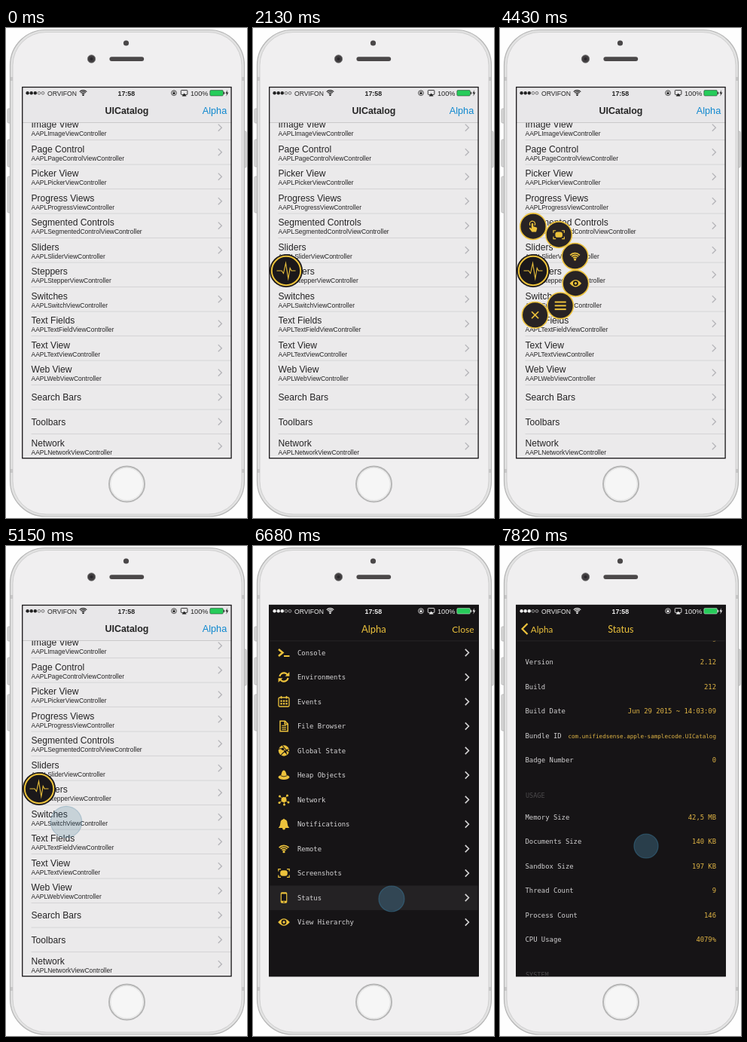
Animation of 320x650 px, one loop 8000 ms. Source, as an HTML page with a canvas:

```html
<!DOCTYPE html>
<html lang="en">
<head>
<meta charset="utf-8">
<title>Debug menu demo</title>
<style>
html, body { margin: 0; width: 100%; height: 100%; overflow: hidden; background: #fff; }
canvas { display: block; width: 320px; height: 650px; }
</style>
</head>
<body>
<canvas id="stage"></canvas>
<script>
const LOOP = 8000, ROW = 32.5, TAU = Math.PI * 2;
const GOLD = '#ecc23c', DARK = '#161416', INK = '#252425';
const SANS = '"Liberation Sans", Arial, sans-serif';
const MONO = '"DejaVu Sans Mono", monospace';
const HUMAN = 'Lato, sans-serif';

const canvas = document.getElementById('stage');
const c = canvas.getContext('2d');
const dpr = window.devicePixelRatio || 1;
canvas.width = 320 * dpr;
canvas.height = 650 * dpr;

const ramp = (t, a, b) => Math.min(1, Math.max(0, (t - a) / (b - a)));
const smooth = x => x * x * (3 - 2 * x);
const spring = (t, start, k) => {
  const x = Math.max(0, t - start) * k;
  return 1 - (1 + x) * Math.exp(-x);
};

function text(s, x, y, font, color, align = 'left') {
  c.font = font;
  c.fillStyle = color;
  c.textAlign = align;
  c.fillText(s, x, y);
}
function rect(x, y, w, h, color) {
  c.fillStyle = color;
  c.fillRect(x, y, w, h);
}
function round(x, y, w, h, r, fill, stroke, lw = 1) {
  c.beginPath();
  c.roundRect(x, y, w, h, r);
  paint(fill, stroke, lw);
}
function disc(x, y, r, fill, stroke, lw = 1) {
  c.beginPath();
  c.arc(x, y, r, 0, TAU);
  paint(fill, stroke, lw);
}
function paint(fill, stroke, lw) {
  if (fill) { c.fillStyle = fill; c.fill(); }
  if (stroke) { c.strokeStyle = stroke; c.lineWidth = lw; c.stroke(); }
}
function line(pts, color, lw) {
  c.beginPath();
  for (let i = 0; i < pts.length; i += 2) c.lineTo(pts[i], pts[i + 1]);
  paint(null, color, lw);
}
function shape(d, fill, stroke, lw) {
  const p = new Path2D(d);
  if (fill) { c.fillStyle = fill; c.fill(p); }
  if (stroke) { c.strokeStyle = stroke; c.lineWidth = lw; c.stroke(p); }
}
function at(x, y, draw, scale = 1) {
  c.save();
  c.translate(x, y);
  c.scale(scale, scale);
  draw();
  c.restore();
}
const chevron = (x, y, color, lw) => line([x - 2.2, y - 4.6, x + 2.4, y, x - 2.2, y + 4.6], color, lw);

function wifi(color, r = 2.5, lw = 1.7) {
  for (let i = 1; i < 4; i++) {
    c.beginPath();
    c.arc(0, 4.5, r * i + .6, -Math.PI * .76, -Math.PI * .24);
    paint(null, color, lw);
  }
  disc(0, 4.2, r * .6, color);
}

// Icons are drawn around 0,0 in a box of about 15 px
const icon = {
  console() {
    line([-7, -4.5, -1.5, 0, -7, 4.5], GOLD, 2.5);
    line([0, 4.5, 7.5, 4.5], GOLD, 2);
  },
  refresh() {
    for (const s of [1, -1]) {
      c.save();
      c.scale(s, s);
      c.beginPath();
      c.arc(0, 0, 5.7, Math.PI * 1.06, Math.PI * 1.8);
      paint(null, GOLD, 2.2);
      shape('M7.4 -7V-1.2H1.6Z', GOLD);
      c.restore();
    }
  },
  calendar() {
    round(-7, -5.5, 14, 12, 1.5, null, GOLD, 1.3);
    line([-3.5, -7.5, -3.5, -4], GOLD, 1.6);
    line([3.5, -7.5, 3.5, -4], GOLD, 1.6);
    for (let i = 0; i < 6; i++) rect(-4.6 + i % 3 * 3.5, -2 + (i > 2) * 3.6, 2.3, 2.3, GOLD);
  },
  file() {
    shape('M-5 -6.8H1.5L5.2 -3V6.8H-5ZM1.2 -6.8V-2.6H5.2', null, GOLD, 1.5);
    for (const y of [-.7, 1.8, 4.2]) line([-2.8, y, 3, y], GOLD, 1.2);
  },
  globe() {
    disc(0, 0, 7.2, GOLD);
    shape('M-7 -2Q-1 -5 4 5M-4 6Q1 0 6.5 -2M-2 -7Q1 -2 7 2', null, DARK, 1.1);
    disc(-1.6, -2.2, 1.7, DARK);
    disc(2.2, 1.5, 1.5, DARK);
  },
  heap() {
    shape('M-7.5 3Q-7 .5 -3.8 .3Q-2.5 -6.8 0 -6.5Q2.5 -6.2 3.8 .3Q7 .5 7.5 3Q5.5 6 0 6T-7.5 3Z', GOLD);
    shape('M-4 .8Q0 3 4 .8', null, DARK, .8);
  },
  network() {
    const nodes = [-5.5, -4.5, 4.5, -5.5, 6, 3.5, -6, 4, .5, 6.6];
    for (let i = 0; i < nodes.length; i += 2) {
      line([0, 0, nodes[i], nodes[i + 1]], GOLD, .8);
      disc(nodes[i], nodes[i + 1], 1.5, GOLD);
    }
    disc(0, 0, 3.5, GOLD);
  },
  bell() {
    shape('M-7.2 5Q-4.7 3 -4.6 -1.5Q-4.4 -5.6 -1.2 -6.2Q0 -8.4 1.2 -6.2Q4.4 -5.6 4.6 -1.5Q4.7 3 7.2 5Z', GOLD);
    disc(0, 5.6, 1.9, GOLD);
  },
  wifi() { wifi(GOLD, 2.7, 1.7); },
  capture() {
    round(-4.8, -3.7, 9.6, 7.4, 3.2, GOLD);
    shape('M-7.2 -2.5V-5.4H-4M7.2 -2.5V-5.4H4M-7.2 2.5V5.4H-4M7.2 2.5V5.4H4', null, GOLD, 1.2);
  },
  phone() {
    round(-4.3, -7.2, 8.6, 14.4, 1.6, GOLD);
    rect(-3.1, -5, 6.2, 9.2, DARK);
    disc(0, 5.7, .8, DARK);
  },
  eye() {
    shape('M-7.8 0Q0 -9.6 7.8 0Q0 9.6 -7.8 0Z', GOLD);
    disc(0, 0, 3.4, DARK);
    disc(0, 0, 1.7, GOLD);
  },
  tap() {
    c.beginPath();
    c.arc(-1, -3.4, 3.6, Math.PI * .8, Math.PI * 2.2);
    paint(null, GOLD, 1.2);
    shape('M-2.2 -3.5Q-1 -5.2 .2 -3.5V0L4.6 1.2Q5.4 1.6 5.2 3L4 7.4H-1.6L-5.2 2.6Q-5 1 -3.6 1.8L-2.2 3Z', GOLD);
  },
  menu() { for (const y of [-4.8, 0, 4.8]) line([-7.5, y, 7.5, y], GOLD, 2); },
  close() {
    line([-4.5, -4.5, 4.5, 4.5], GOLD, 1.7);
    line([4.5, -4.5, -4.5, 4.5], GOLD, 1.7);
  }
};

const catalog = ['Image View|ImageView', 'Page Control|PageControlView', 'Picker View|PickerView',
  'Progress Views|ProgressView', 'Segmented Controls|SegmentedControlView', 'Sliders|SliderView',
  'Steppers|StepperView', 'Switches|SwitchView', 'Text Fields|TextFieldView', 'Text View|TextView',
  'Web View|WebView', 'Search Bars', 'Toolbars', 'Network|NetworkView'].map(s => s.split('|'));
const tools = [['Console', 'console'], ['Environments', 'refresh'], ['Events', 'calendar'],
  ['File Browser', 'file'], ['Global State', 'globe'], ['Heap Objects', 'heap'],
  ['Network', 'network'], ['Notifications', 'bell'], ['Remote', 'wifi'],
  ['Screenshots', 'capture'], ['Status', 'phone'], ['View Hierarchy', 'eye']];
const info = [['Name', 'UICatalog'], ['Version', '2.12'], ['Build', '212'],
  ['Build Date', 'Jun 29 2015 ~ 14:03:09'],
  ['Bundle ID', 'com.unifiedsense.apple-samplecode.UICatalog'], ['Badge Number', '0']];
const usage = [['Memory Size', '42,5 MB'], ['Documents Size', '140 KB'], ['Sandbox Size', '197 KB'],
  ['Thread Count', '9'], ['Process Count', '146'], ['CPU Usage', '4079%']];
const petals = ['tap', 'capture', 'wifi', 'eye', 'menu', 'close'];

// fade in from-to, fade out from-to, x, y, radius
const touches = [
  [3120, 3240, 3515, 3660, 51, 343, 16.5],
  [4610, 4790, 5060, 5240, 80, 366, 16.5],
  [6490, 6600, 6770, 6880, 184, 468, 17],
  [7440, 7540, 8100, 8200, 194, 460, 16]
];
const dragged = t => 62 * smooth(ramp(t, 7500, 7820));

function phone() {
  rect(0, 0, 320, 650, '#fefefe');
  for (const [x, y, h] of [[2, 107, 19], [2, 148, 36], [2, 197, 48], [314, 137, 48]])
    round(x, y, 5, h, 1.5, '#d8d8d8', '#aeaeae', .8);
  round(5.5, 2.5, 311, 645.5, 47, '#e2e2e2', '#b4b4b4', 1.2);
  for (const y of [65, 585]) {
    rect(6, y, 4, 5, '#c6c6c6');
    rect(312, y, 4, 5, '#c6c6c6');
  }
  round(9, 5.5, 304, 639.5, 44, '#f0eff0', '#c8c8c8', .8);
  disc(159.5, 20, 3.6, '#4a4748');
  disc(113.5, 41, 5.2, '#413e40', '#777', .8);
  disc(113.5, 41, 2, '#29272b');
  round(137.4, 38.2, 45.8, 5.8, 2.9, '#4b4849');
  disc(160.5, 605, 23.5, '#f3f3f3', '#b6b6b6', 2);
  disc(160.5, 605, 21.5, '#f6f6f6', '#dedede', .7);
}

function catalogScreen() {
  rect(21, 78, 279, 494, '#ebeaeb');
  catalog.forEach(([title, cls], i) => {
    const mid = 132.2 + ROW * i;
    text(title, 33.5, cls ? mid + .2 : mid + 4.5, '12.1px ' + SANS, INK);
    if (cls) text('AAPL' + cls + 'Controller', 33.5, mid + 10.9, '8.48px ' + SANS, INK);
    chevron(284, mid, '#b4b4b8', 1.3);
    rect(33.5, mid + 16, 266, .7, '#cbcacc');
  });
  rect(21, 78, 279, 47.3, '#e8e7e9');
  rect(21, 125.2, 279, .7, '#bdbcbe');
  text('UICatalog', 160.5, 114, 'bold 12.4px ' + SANS, '#252525', 'center');
  text('Alpha', 293.2, 114, '12.7px ' + SANS, '#0f88cf', 'right');
}

function mainButton() {
  disc(0, 0, 22, '#1b181a');
  disc(0, 0, 19.2, null, GOLD, 2);
  line([-12.5, 0, -6, 0, -3.5, 3.5, -.5, -10, 2.8, 10.5, 5.2, -3.5, 7, 0, 12.5, 0], GOLD, 1.1);
}

function radialMenu(t) {
  const shown = smooth(ramp(t, 1350, 1600));
  if (!shown) return;
  const open = spring(t, 3390, .045) * (1 - smooth(ramp(t, 4940, 5120)));
  if (open > .02) {
    petals.forEach((name, i) => {
      const a = (-90 + 35.5 * i) * Math.PI / 180, d = 58.8 * open;
      c.globalAlpha = Math.min(1, open * 2);
      at(44 + d * Math.cos(a), 322 + d * Math.sin(a), () => {
        disc(0, 0, 17.3, '#282324', GOLD, 1.6);
        icon[name]();
      }, .4 + .6 * open);
    });
  }
  c.globalAlpha = shown;
  at(44, 322, mainButton);
  c.globalAlpha = 1;
}

function toolList(lit) {
  rect(21, 78, 279, 494, DARK);
  if (lit) rect(21, 450.5, 279, ROW, '#242224');
  tools.forEach(([label, name], i) => {
    const y = 141.5 + ROW * i;
    at(41, y, icon[name]);
    text(label, 59, y + 3.2, '8.9px ' + MONO, '#d6d5d6');
    chevron(284, y, '#d6d5d6', 1.6);
  });
}

function statusList(scroll) {
  rect(21, 78, 279, 494, DARK);
  const row = ([label, value], y) => {
    text(label, 33.5, y + 3.2, '8.9px ' + MONO, '#d0cfd0');
    text(value, 287, y + 3.2, (value.length > 30 ? 7.6 : 8.85) + 'px ' + MONO, '#dfb445', 'right');
  };
  const head = (s, y) => text(s, 34, y + 3, '8.5px ' + MONO, '#4c4a4c');
  const top = 183.5 - scroll;
  head('APPLICATION', top - 28);
  info.forEach((r, i) => row(r, top + ROW * i));
  head('USAGE', top + 209.5);
  usage.forEach((r, i) => row(r, top + 238 + ROW * i));
  head('SYSTEM', top + 447);
}

function darkNav(push) {
  rect(21, 78, 279, 47.5, DARK);
  rect(21, 125.5, 279, .8, '#2b292b');
  const mix = (a, b) => a + (b - a) * push;
  text('Alpha', mix(160.3, 55.5), mix(115, 114.6), mix(13, 11.6) + 'px ' + HUMAN, GOLD, 'center');
  c.globalAlpha = 1 - push;
  text('Close', 293.5, 115, '12px ' + HUMAN, GOLD, 'right');
  c.globalAlpha = push;
  text('Status', mix(260, 160.3), 115, '12.6px ' + HUMAN, GOLD, 'center');
  line([36.5, 103, 29.5, 110, 36.5, 117], GOLD, 2.2);
  c.globalAlpha = 1;
}

function alphaScreen(t) {
  const up = spring(t, 5440, .033);
  if (!up) return;
  const push = spring(t, 6980, .022);
  c.save();
  c.translate(0, 493 * (1 - up));
  at(-83 * push, 0, () => toolList(t > 6560));
  if (push) at(278 * (1 - push), 0, () => statusList(dragged(t)));
  darkNav(push);
  c.restore();
}

function statusBar(color) {
  for (let i = 0; i < 5; i++)
    disc(28.6 + 5.1 * i, 86.3, i < 3 ? 2.2 : 1.8, i < 3 && color, i < 3 ? null : color, .6);
  text('ORVIFON', 55, 89.6, '8.6px ' + SANS, color);
  at(102.5, 85.6, () => wifi(color, 2.6, 1.5), .78);
  text('17:58', 159.8, 89.6, 'bold 8.8px ' + SANS, color, 'center');
  disc(223, 86.2, 3.4, null, color, .8);
  round(221.5, 85.6, 3, 2.4, .4, color);
  disc(223, 85.3, 1.1, null, color, .6);
  round(232.3, 82.6, 8.6, 5.8, .8, null, color, .9);
  shape('M233.6 90.6L236.6 86.6L239.6 90.6Z', color);
  text('100%', 268.5, 89.6, '9.2px ' + SANS, color, 'right');
  round(270.8, 82.6, 17.6, 7.4, 1.4, '#26cc5a', color, .5);
  rect(288.9, 84.8, 1.2, 3, color);
  shape('M294 82.2L291.4 86.8H293.1L292.4 90.4L295.3 85.6H293.4Z', color);
}

function touch(t, [a, b, d, e, x, y, r]) {
  const out = ramp(t, d, e), alpha = ramp(t, a, b) * (1 - out);
  if (!alpha) return;
  c.globalAlpha = alpha;
  disc(x, y - dragged(t), r * (1 + .5 * out), 'rgba(68,118,146,.43)', 'rgba(58,118,150,.55)', 1.2);
  c.globalAlpha = 1;
}

function draw(t) {
  c.setTransform(dpr, 0, 0, dpr, 0, 0);
  phone();
  c.save();
  c.beginPath();
  c.rect(21, 78, 279, 493);
  c.clip();
  catalogScreen();
  radialMenu(t);
  alphaScreen(t);
  statusBar(t < 5530 ? '#222' : '#eee');
  touches.forEach(p => touch(t, p));
  c.restore();
  c.strokeStyle = '#171517';
  c.lineWidth = 1.3;
  c.strokeRect(21.7, 78.5, 277.4, 492.2);
}

const start = performance.now();
function tick() {
  draw((performance.now() - start) % LOOP);
  requestAnimationFrame(tick);
}
tick();
</script>
</body>
</html>
```
